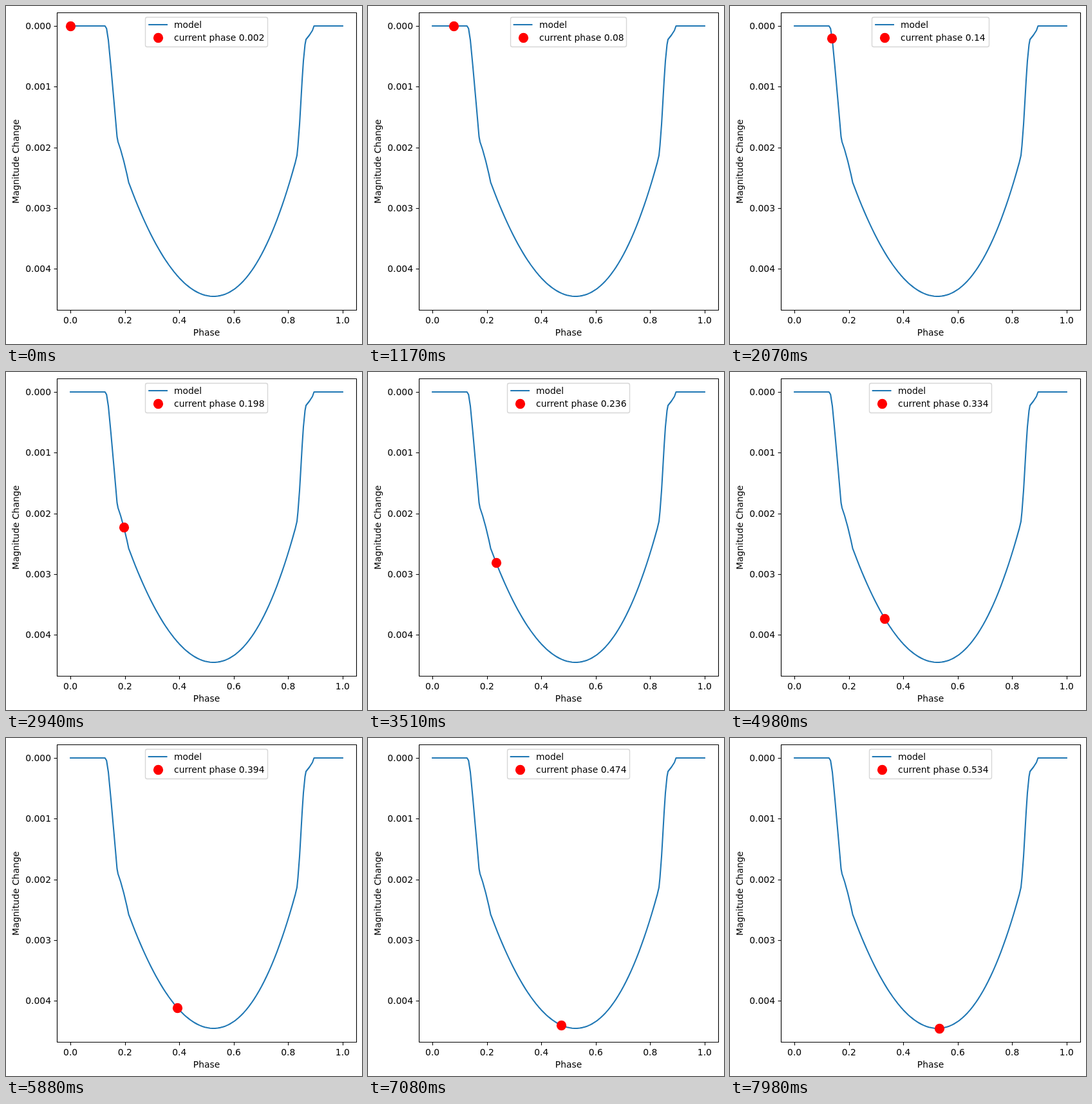
These frames come from a looping animation (553x525 px, 8000 ms). An HTML page with a canvas:

```html
<!DOCTYPE html>
<html lang="en">
<head>
<meta charset="utf-8">
<title>Phase curve</title>
<style>
  html, body { margin: 0; width: 100%; height: 100%; overflow: hidden; background: #fff; }
  canvas { display: block; }
</style>
</head>
<body>
<canvas id="stage" width="553" height="525"></canvas>
<script>
const ctx = document.getElementById('stage').getContext('2d');

const LOOP = 8000, STEP = 30;
const EM = 13.89;                                  // 10 pt at 100 dpi
const AXES = { left: 79, right: 544, top: 10, bottom: 472 };
const X0 = 100.14, X_SCALE = 422.73;               // phase to pixels
const Y0 = 31, Y_SCALE = 94.35;                    // 0.001 magnitude to pixels
const BLUE = '#1f77b4', RED = '#ff0000';

// Straight ingress and egress, joined by a skewed parabola
const ingress = [
  [X0, Y0], [153.8, Y0], [156.2, 35], [159, 53], [163, 95], [168.6, 158],
  [172.5, 203], [174, 211], [178, 223], [183, 241], [188, 262], [190.5, 273.8]
];
const egress = [
  [449.5, 242.6], [452, 232], [453.5, 217], [456, 184], [458, 150], [460, 115],
  [462, 85], [464.5, 60], [466, 52], [471.5, 45], [476, 38], [478.5, Y0],
  [X0 + X_SCALE, Y0]
];
const DIP = { x: 322.5, y: 451 };

function dipY(x) {
  const d = Math.abs(x - DIP.x);
  const bend = x < DIP.x ? 0.01 + 0.0000013 * d : 0.0101 + 0.0000222 * d;
  return DIP.y - bend * d * d;
}

const curve = [...ingress];
for (let x = 193; x < 449; x += 4) curve.push([x, dipY(x)]);
curve.push(...egress);

function curveY(x) {
  if (x > 190.5 && x < 449.5) return dipY(x);
  const i = Math.max(1, curve.findIndex(p => p[0] >= x));
  const [xa, ya] = curve[i - 1], [xb, yb] = curve[i];
  return ya + (yb - ya) * (x - xa) / (xb - xa);
}

const snap = v => Math.round(v) + 0.5;

function polyline(points, color, width) {
  ctx.beginPath();
  points.forEach(([x, y]) => ctx.lineTo(x, y));
  ctx.strokeStyle = color;
  ctx.lineWidth = width;
  ctx.stroke();
}

function label(text, x, y, align = 'left') {
  ctx.fillStyle = '#000';
  ctx.textAlign = align;
  ctx.fillText(text, x, y);
}

function dot(x, y) {
  ctx.beginPath();
  ctx.arc(snap(x), snap(y), 7.64, 0, 2 * Math.PI);
  ctx.fillStyle = RED;
  ctx.fill();
}

function drawAxes() {
  const { left, right, top, bottom } = AXES;
  ctx.lineCap = 'butt';
  for (let i = 0; i <= 5; i++) {
    const x = X0 + X_SCALE * i / 5;
    polyline([[snap(x), bottom + 0.5], [snap(x), bottom + 5.4]], '#000', 1.11);
    label((i / 5).toFixed(1), x, 493, 'center');
  }
  for (let i = 0; i <= 4; i++) {
    const y = Y0 + Y_SCALE * i;
    polyline([[left + 0.5, snap(y)], [left - 4.4, snap(y)]], '#000', 1.11);
    label((i / 1000).toFixed(3), 70, Math.round(y + 5), 'right');
  }
  ctx.strokeStyle = '#000';
  ctx.lineWidth = 1.11;
  ctx.strokeRect(left + 0.5, top + 0.5, right - left, bottom - top);

  label('Phase', 311.5, 512, 'center');
  ctx.save();
  ctx.translate(20, 241.5);
  ctx.rotate(-Math.PI / 2);
  label('Magnitude Change', 0, 0, 'center');
  ctx.restore();
}

function drawLegend(phase) {
  const text = 'current phase ' + Number(phase.toFixed(3));
  ctx.textAlign = 'left';
  const width = 3.6 * EM + ctx.measureText(text).actualBoundingBoxRight;
  const left = 311.5 - width / 2;
  const boxLeft = Math.floor(left) + 0.5, boxRight = Math.floor(left + width) + 0.5;

  ctx.beginPath();
  ctx.roundRect(boxLeft, 17.5, boxRight - boxLeft, 46, 2.8);
  ctx.fillStyle = 'rgba(255,255,255,0.8)';
  ctx.fill();
  ctx.strokeStyle = 'rgba(204,204,204,0.8)';
  ctx.lineWidth = 1.39;
  ctx.stroke();

  const lineX = left + 0.4 * EM, textX = Math.round(left + 3.2 * EM);
  ctx.lineCap = 'square';
  polyline([[lineX, 29], [lineX + 2 * EM, 29]], BLUE, 2.08);
  dot(lineX + EM, 49);
  label('model', textX, 34);
  label(text, textX, 54);
}

function draw(time) {
  const step = Math.floor((time % LOOP) / STEP);
  const x = X0 + X_SCALE * step / 500;

  ctx.fillStyle = '#fff';
  ctx.fillRect(0, 0, 553, 525);
  ctx.font = EM + 'px "DejaVu Sans", sans-serif';
  ctx.lineJoin = 'round';
  ctx.lineCap = 'square';
  polyline(curve, BLUE, 2.08);
  dot(x, curveY(x));
  drawAxes();
  drawLegend((step + 1) / 500);
}

let start;
function tick(now) {
  start ??= now;
  draw(now - start);
  requestAnimationFrame(tick);
}
draw(0);
requestAnimationFrame(tick);
</script>
</body>
</html>
```
